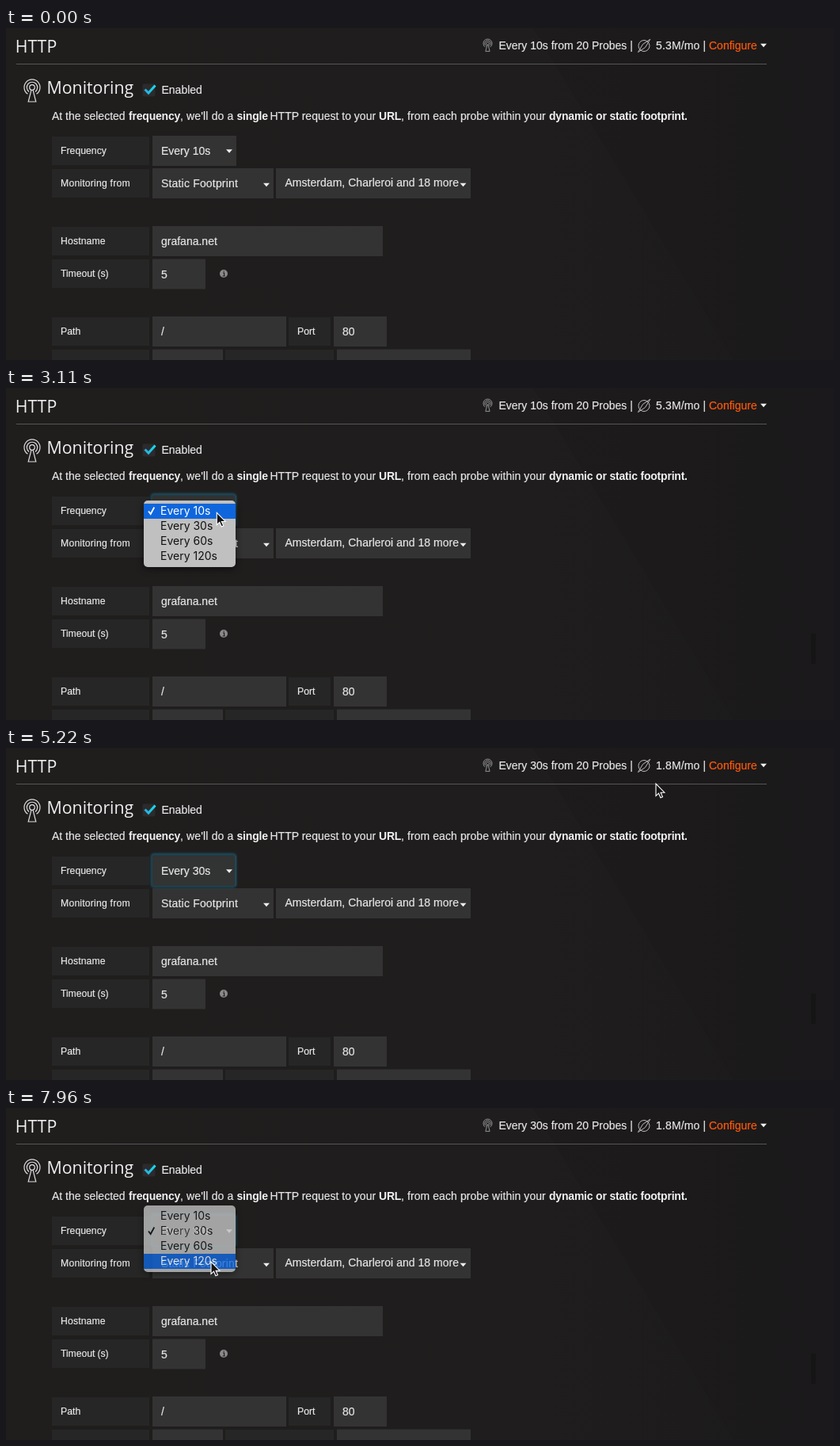
An HTML page for the animation above (8000 ms loop, 1046x419 px).

```html
<!DOCTYPE html>
<html lang="en">
<head>
<meta charset="utf-8">
<title>HTTP monitoring settings</title>
<style>
  html, body { margin: 0; width: 100%; height: 100%; overflow: hidden; background: #1f1d1d; }
  svg { display: block; width: 1046px; height: 419px; }
  text { font: 14px "Liberation Sans", Arial, sans-serif; fill: #e6e6e6; stroke: #e6e6e6; stroke-width: .2px; white-space: pre; }
  .label { font-size: 12.25px; }
  .title { font: 21.3px "Open Sans", sans-serif; stroke: none; fill: #f0f0f0; }
  .bold { font-weight: bold; letter-spacing: -.2px; stroke: none; fill: #f2f2f2; }
  .link { fill: #ff5a0a; stroke: #ff5a0a; }
  .item { font-family: Inter, sans-serif; fill: #111; stroke: none; }
  .item.on { fill: #fff; }
</style>
</head>
<body>
<svg id="stage" viewBox="0 0 1046 419">
  <defs>
    <linearGradient id="shade" x1="0" x2="1">
      <stop offset="0" stop-color="#201d1d"/>
      <stop offset=".65" stop-color="#1f1d1d"/>
      <stop offset="1" stop-color="#1b1a1b"/>
    </linearGradient>
    <linearGradient id="tickTone" x1="0" x2="1">
      <stop offset="0" stop-color="#2fa8dc"/>
      <stop offset="1" stop-color="#12dcf0"/>
    </linearGradient>
    <filter id="soft" x="-20%" y="-40%" width="140%" height="180%"><feGaussianBlur stdDeviation="1.6"/></filter>
    <filter id="shadow" x="-20%" y="-20%" width="140%" height="150%"><feGaussianBlur stdDeviation="5"/></filter>
    <g id="antenna" fill="none">
      <path d="M-5.5 8.3A10 10 0 1 1 5.5 8.3M-3.9 5.4A6.7 6.7 0 1 1 3.9 5.4"/>
      <circle r="3.3"/>
      <path d="M-1 3.2L-4.8 18H4.8L1 3.2"/>
    </g>
    <path id="caret" d="M-4 -2.2H4L0 2.2Z" fill="#eee"/>
  </defs>

  <rect width="1046" height="419" fill="url(#shade)"/>
  <path d="M666 0H1046V419H920Z" fill="#1a191b" opacity=".35"/>
  <rect id="bar" x="1017" y="310" width="6" height="38" fill="#161516"/>

  <text class="title" x="11.7" y="31">HTTP</text>
  <rect x="13" y="45" width="948" height="1" fill="#565555"/>
  <use href="#antenna" transform="translate(608.5 19.5) scale(.55)" stroke="#aaa" stroke-width="1.5"/>
  <text id="rate" x="622.5" y="27"></text>
  <g fill="none" stroke="#bbb" stroke-width="1">
    <circle cx="806" cy="22.5" r="7"/>
    <path d="M798.5 30.5L804.5 20.5L813.8 14.2L807.5 24.5Z"/>
  </g>
  <text id="usage" x="821" y="27" letter-spacing=".15"></text>
  <text x="880.5" y="27">|</text>
  <text class="link" x="888" y="27">Configure</text>
  <use href="#caret" x="957" y="22"/>

  <use href="#antenna" transform="translate(33 75)" stroke="#ddd" stroke-width="1.2"/>
  <text class="title" x="51.5" y="83">Monitoring</text>
  <rect x="172.5" y="70.5" width="16" height="16" rx="2" fill="#2b2b2d"/>
  <path d="M175.5 77.5L180 82L188.5 72.5" fill="none" stroke="url(#tickTone)" stroke-width="3"/>
  <text x="196.5" y="83">Enabled</text>

  <g id="intro"></g>
  <g id="form"></g>
  <g id="focus">
    <rect x="184.5" y="134.5" width="105" height="40" rx="3" fill="none" stroke="#1f566c" stroke-width="3" filter="url(#soft)"/>
    <rect x="185" y="135.5" width="104" height="38.5" rx="2" fill="#323333" stroke="#243a43" stroke-width="1"/>
  </g>
  <text id="choice" x="196" y="160"></text>
  <use href="#caret" x="282" y="155.5"/>

  <g id="menu">
    <rect x="174" y="4" width="116" height="82" rx="5" fill="#000" opacity=".55" filter="url(#shadow)"/>
    <rect x="174" width="116" height="84" rx="5" fill="#c0c0c0"/>
    <rect id="mark" x="174" width="116" height="19" fill="#0f66dc"/>
    <g id="items"></g>
    <path id="tick" d="M180 13.5L182.7 17L187.3 8.5" fill="none" stroke-width="1.8"/>
  </g>
  <path id="cursor" d="M0 0V15.4L3.5 12.2L5.9 17.7L8.5 16.6L6.1 11.2H10.9Z" fill="#151515" stroke="#fff" stroke-width="1.1"/>
</svg>
<script>
const LOOP = 8000;
const $ = id => document.getElementById(id);
const set = (el, name, value) => el.setAttribute(name, value);
const show = (el, on) => set(el, 'visibility', on ? 'visible' : 'hidden');

const text = (x, y, s, cls = '', gap = 0) =>
  `<text class="${cls}" x="${x}" y="${y}" letter-spacing="${gap}">${s}</text>`;
const box = (x, y, w, h, fill) => `<rect x="${x}" y="${y}" width="${w}" height="${h}" fill="${fill}"/>`;
const label = (x, y, w, s, gap) => box(x, y, w, 36, '#262626') + text(x + 11, y + 22, s, 'label', gap);
const field = (x, y, w, s, gap) => box(x, y, w, 38, '#333') + text(x + 11, y + 24, s, '', gap);
const caret = (x, y) => `<use href="#caret" x="${x}" y="${y}"/>`;

$('intro').innerHTML = [
  [58, 'At the selected'],
  [155, 'frequency', 'bold'],
  [220, ", we'll do a", '', .15],
  [291.5, 'single', 'bold'],
  [333.5, 'HTTP request to your'],
  [471, 'URL', 'bold'],
  [499, ', from each probe within your', '', .08],
  [686, 'dynamic or static footprint', 'bold'],
  [857, '.', 'bold']
].map(([x, s, cls, gap]) => text(x, 116, s, cls, gap)).join('');

$('form').innerHTML = [
  label(58, 137, 123, 'Frequency'),
  field(185, 136, 106, ''),
  label(58, 178, 123, 'Monitoring from', .18),
  field(185, 177, 153, 'Static Footprint', .18),
  caret(329, 198),
  box(341, 177, 246, 38, '#333'),
  text(352.5, 200, 'Amsterdam, Charleroi and 18 more', '', .03),
  caret(577.5, 198),
  label(58, 251, 123, 'Hostname', .12),
  field(185, 250, 291, 'grafana.net'),
  label(58, 292, 123, 'Timeout (s)', -.08),
  field(185, 291.5, 67, '5'),
  '<circle cx="275" cy="310" r="5" fill="#8b8b8b"/>',
  '<path d="M274 309H275.6V313M273.6 313H276.8M274.6 307H275.9" stroke="#222" stroke-width="1.2" fill="none"/>',
  label(58, 365, 123, 'Path'),
  field(185, 364, 169, '/'),
  label(357, 365, 53, 'Port'),
  field(414, 364, 67, '80'),
  label(58, 406, 123, 'Method'),
  field(185, 405.5, 89, 'GET'),
  label(277, 406, 137, 'Accept Header'),
  field(418, 405.5, 169, '')
].join('');

const seconds = [10, 30, 60, 120];
$('items').innerHTML = seconds.map((s, i) => text(195, 18.2 + 19 * i, `Every ${s}s`, 'item')).join('');
const items = [...$('items').children];

// Pointer moves: start, end, steps, then a quadratic curve.
const moves = [
  [840, 1590, 13, [1012, 322], [780, 185], [481, 155]],
  [1650, 2220, 11, [481, 155], [370, 147], [267, 153]],
  [3110, 3460, 6, [267, 153], [265, 165], [264, 168]],
  [4580, 5220, 12, [264, 168], [560, 228], [821, 45]],
  [6060, 6850, 15, [821, 45], [480, 65], [257, 157]],
  [7200, 7430, 5, [257, 157], [259, 175], [259, 194]]
];
// Menu openings: open time, pick time, top edge, checked row.
const menus = [[2570, 3940, 142, 0], [6910, 7850, 123, 1]];

const ease = u => 1 - (1 - u ** 1.5) ** 3;

function pointer(t) {
  const move = moves.filter(m => t >= m[0]).pop();
  if (!move) return null;
  const [from, to, n, a, b, c] = move;
  const step = Math.floor((t - from) / (to - from) * (n - 1) + .01) + 1;
  const u = ease(Math.min(1, step / n)), v = 1 - u;
  return a.map((p, i) => v * v * p + 2 * u * v * b[i] + u * u * c[i]);
}

function drawMenu(t, tip) {
  const open = menus.filter(m => t >= m[0]).pop();
  const since = open ? t - open[1] : 0;
  const fade = since < 110 ? 1 : .8 - .2 * Math.floor((since - 110) / 60);
  const on = !!open && fade > .01;
  set($('menu'), 'display', on ? 'inline' : 'none');
  if (!on) return;
  const [, , top, checked] = open;
  const blink = since >= 0 && since < 60;
  const row = blink ? -1 : Math.max(0, Math.min(3, Math.floor((tip[1] - top - 4) / 19)));
  set($('menu'), 'transform', `translate(0 ${top})`);
  set($('menu'), 'opacity', fade);
  show($('mark'), row >= 0);
  set($('mark'), 'y', 4 + 19 * row);
  items.forEach((el, i) => el.classList.toggle('on', i === row));
  set($('tick'), 'transform', `translate(0 ${19 * checked})`);
  set($('tick'), 'stroke', row === checked ? '#fff' : '#111');
}

function draw(t) {
  const tip = pointer(t);
  show($('cursor'), tip);
  show($('bar'), tip);
  if (tip) set($('cursor'), 'transform', `translate(${tip[0]} ${tip[1]})`);
  show($('focus'), t >= 2570);
  $('choice').textContent = `Every ${t < 4290 ? 10 : 30}s`;
  const slow = t >= 4400;
  $('rate').textContent = `Every ${slow ? 30 : 10}s from 20 Probes |`;
  $('usage').textContent = slow ? '1.8M/mo' : '5.3M/mo';
  drawMenu(t, tip);
}

const begin = performance.now();
function tick() {
  draw((performance.now() - begin) % LOOP);
  requestAnimationFrame(tick);
}
tick();
</script>
</body>
</html>
```
